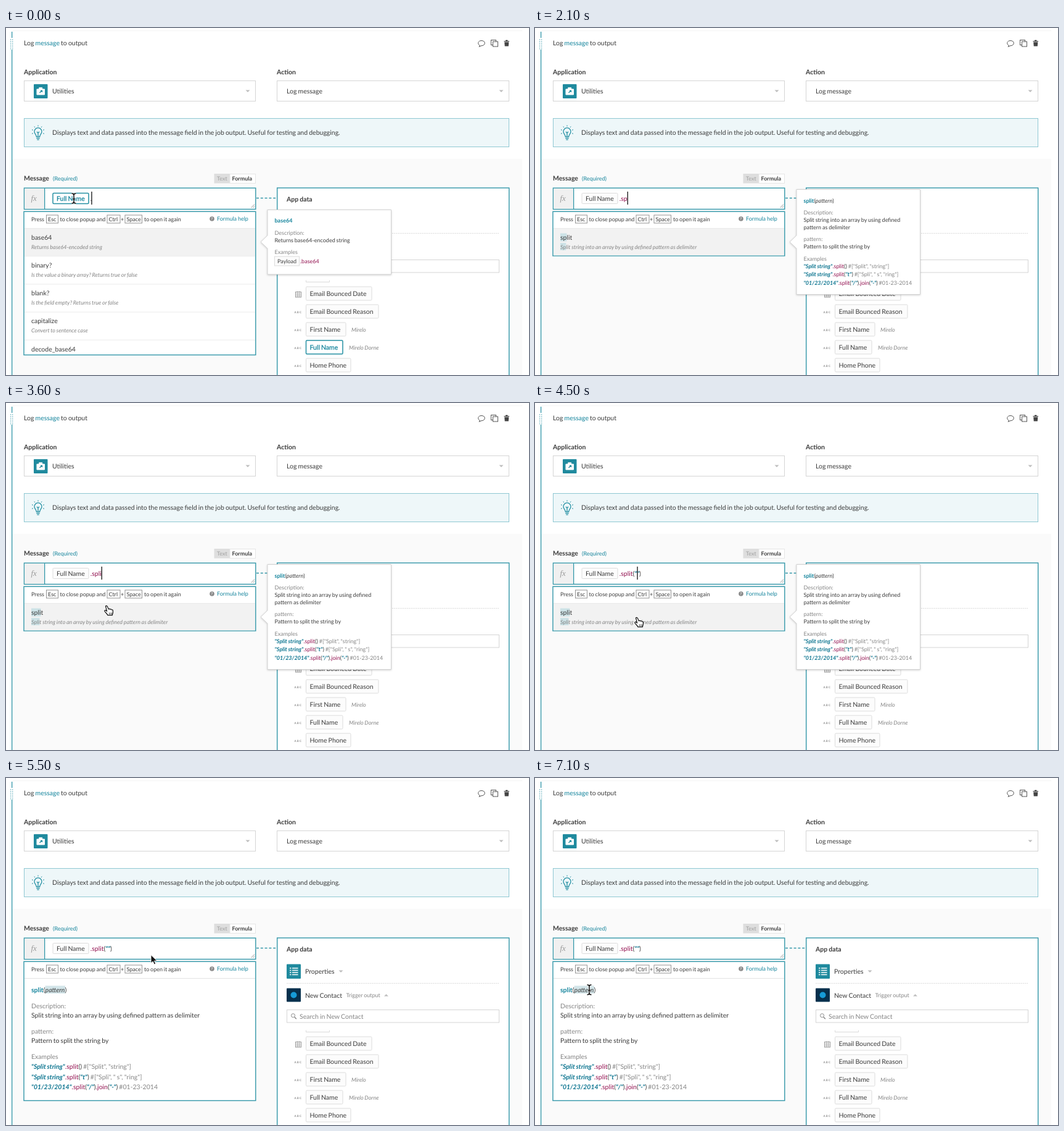
Animation of 848x562 px, one loop 7200 ms. Source, as an HTML page:

```html
<!DOCTYPE html>
<html lang="en">
<head>
<meta charset="utf-8">
<title>Formula autocomplete</title>
<style>
html, body { margin: 0; width: 100%; height: 100%; overflow: hidden; background: #fff; }
svg { display: block; width: 848px; height: 562px; }
text { font: 10.5px Lato, sans-serif; word-spacing: -.054em; fill: #3c3c3c; text-rendering: geometricPrecision; white-space: pre; }
.b { font-weight: 700; }
.s { font-size: 9px; }
.i { font-style: italic; }
.g { fill: #858585; }
.l { fill: #a0a0a0; }
.t { fill: #14849c; }
.m { fill: #92104f; }
.q { fill: #0d7590; font-weight: 700; font-style: italic; }
.abc { font-size: 4.6px; font-weight: 700; letter-spacing: 1.1px; fill: #8c8c8c; }
.teal { stroke: #3397a9; stroke-width: 1.4; }
.icon { fill: none; stroke: #555; }
.chip rect { fill: #fcfcfc; stroke: #dcdcdc; }
.chip.on rect { fill: #fff; stroke: #2590a3; stroke-width: 1.5; }
.chip.on text { fill: #14849c; stroke: #14849c; stroke-width: .25; }
.float { filter: drop-shadow(0 1px 1.5px rgba(0, 0, 0, .18)); }
</style>
</head>
<body>
<svg id="stage" viewBox="0 0 848 562"></svg>
<script>
const LOOP = 7200;
const text = (x, mid, str, cls = '') => `<text x="${x}" y="${mid + 3.8}" class="${cls}">${str}</text>`;
const small = (x, mid, str, cls = '') => `<text x="${x}" y="${mid + 3.2}" class="s ${cls}">${str}</text>`;
const rect = (x, y, x2, y2, attrs) => `<rect x="${x}" y="${y}" width="${x2 - x}" height="${y2 - y}" ${attrs}/>`;
const path = (d, attrs) => `<path d="${d}" ${attrs}/>`;
const span = (cls, str) => `<tspan class="${cls}">${str}</tspan>`;
const group = (id, body, attrs = '') => `<g id="${id}" ${attrs}>${body}</g>`;
const chip = (x, mid, w, h, str, id = '') =>
  `<g class="chip" ${id && `id="${id}"`}>${rect(x + .5, mid - h / 2, x + w, mid + h / 2, 'rx="1.5"')}${text(x + 6.5, mid, str)}</g>`;
const caretDown = (x, y, dir = 1) => path(`M${x - 3.5} ${y - 1.5 * dir}h7l-3.5 ${3.5 * dir}z`, 'fill="#bdbdbd"');
const box = 'fill="#fff" stroke="#d5d5d5"';

// Page around the message field
function page() {
  const select = (x, x2) => rect(x + .5, 85.5, x2 - .5, 118.5, box) + caretDown(x2 - 13, 102);
  let dots = '';
  for (let y = 18; y < 34; y += 3) dots += rect(7, y, 8.3, y + 1.3, 'fill="#5fadbb"') + rect(10, y, 11.3, y + 1.3, 'fill="#5fadbb"');
  let rays = '';
  for (let k = 0; k < 7; k++) {
    const a = Math.PI * (1 + (k - .5) / 5), c = Math.cos(a), s = Math.sin(a);
    rays += `M${52 + c * 8.5} ${168 + s * 8.5}L${52 + c * 10.5} ${168 + s * 10.5}`;
  }
  return rect(0, 0, 848, 562, 'fill="#fff"')
    + rect(10, 212, 837, 562, 'fill="#fafafa"')
    + rect(10, 4, 837, 5, 'fill="#f3f3f3"')
    + rect(9, 6, 10.3, 562, 'fill="#3397a9"')
    + rect(6, 16, 13, 35, 'fill="#fff"') + dots
    + text(29, 24.3, `Log ${span('t', 'message')} to output`)
    + path('M768.3 28.4C764 26 765 20.5 771 20.5c7 0 7 8 0 8.2l-4 1.6z', 'class="icon"')
    + rect(786.5, 19.5, 794.5, 27.5, 'class="icon"') + rect(789.5, 22, 797.5, 30, 'class="icon" style="fill:#fff"')
    + path('M807.5 21h8.5v1.3h-8.5zM810 19.4h3.5v1.6h-3.5zM808.2 23h7.1l-.5 6.5h-6.1z', 'fill="#444"')
    + text(29, 71.2, 'Application', 'b') + text(439, 71.2, 'Action', 'b')
    + select(29, 405) + select(439, 816)
    + rect(45, 91, 67.5, 114, 'fill="#1f8a9e" rx="1"')
    + path('M50 99h12.5v9h-12.5zM53.7 99v-2.3h5v2.3', 'fill="#fff" stroke="#fff"')
    + path('M54.5 105l3.5-3.5M56 101.5h2.5v2.5', 'fill="none" stroke="#1f8a9e" stroke-width="1.3"')
    + text(75, 102.2, 'Utilities') + text(455, 102.2, 'Log message')
    + rect(29.5, 146.5, 815.5, 192.5, 'fill="#eef7f9" stroke="#8fc8d3"')
    + path('M49.3 176c0-3.500-3.300-4.500-3.300-8.300a6 6 0 0 1 12 0c0 3.800-3.300 4.800-3.300 8.300zM49.300 178.500h5.400M50.300 180.800h3.400M50 168l2 2 2-2M52 170v5', 'fill="none" stroke="#2590a3" stroke-width="1.3"')
    + path(rays, 'stroke="#2590a3"')
    + text(75, 169.2, 'Displays text and data passed into the message field in the job output. Useful for testing and debugging.')
    + text(29, 243.2, 'Message', 'b') + small(76, 243.5, '(Required)', 't')
    + rect(337.5, 236, 363, 251.5, 'fill="#dedede"') + small(342, 243.7, 'Text', 'l')
    + rect(363, 236.5, 404.5, 251.5, 'fill="#fff" stroke="#e6e6e6"') + small(366.5, 243.7, 'Formula', 'b');
}

function dataPanel() {
  const fields = [
    [430, 107, 'Email Bounced Date'], [459, 118, 'Email Bounced Reason'],
    [488, 65, 'First Name', 'Mirelo', 560], [517, 60, 'Full Name', 'Mirelo Dorne', 556], [546, 73, 'Home Phone']
  ];
  let grid = '';
  for (let y = 430; y < 436; y += 2) grid += `M470.5 ${y}h7`;
  return path('M406 275.5H439', 'stroke="#3397a9" stroke-width="1.3" stroke-dasharray="4 2.8"')
    + rect(439.7, 259, 815.7, 570, 'fill="#fff" class="teal"')
    + text(455, 277, 'App data', 'b')
    + rect(455, 301.5, 478, 325, 'fill="#1f8a9e" rx="1"')
    + path('M460 308h2.5M464 308h9.5M460 311.5h2.5M464 311.5h9.5M460 315h2.5M464 315h9.5M460 318.5h2.5M464 318.5h9.5', 'stroke="#fff" stroke-width="1.5"')
    + text(485, 313.2, 'Properties') + caretDown(543, 313)
    + path('M455 332.5H800', 'stroke="#dcdcdc" stroke-dasharray="2 1"')
    + rect(455, 340.5, 478, 362.5, 'fill="#06304d" rx="1"') + '<circle cx="466.5" cy="351.5" r="5" fill="#169bd7"/>'
    + text(485, 351.7, 'New Contact') + small(551.5, 352, 'Trigger output', 'g') + caretDown(616.5, 352, -1)
    + rect(455.5, 375.5, 799.5, 396, box)
    + path('M467.8 387.3l3 3', 'stroke="#888" stroke-width="1.6"') + '<circle cx="465.5" cy="384.7" r="3" class="icon" style="stroke:#888"/>'
    + text(476, 385.7, 'Search in New Contact', 'g')
    + path('M486.5 408.5v3h38v-3', 'fill="#fcfcfc" stroke="#dcdcdc"')
    + rect(469.5, 427.5, 478.5, 436, 'fill="none" stroke="#999"') + path(grid + 'M472.5 426v10M475.5 426v10', 'stroke="#aaa" stroke-width=".8"')
    + fields.map(([y, w, label, sample, sx], k) =>
      chip(486, y, w, 22, label, k === 3 ? 'panelChip' : '')
      + (k ? `<text x="467.5" y="${y + 3}" class="abc">ABC</text>` : '')
      + (sample ? small(sx, y + .3, sample, 'i g') : '')).join('');
}

const field = () => rect(29.5, 259.2, 404.8, 293.5, 'fill="#fff" class="teal"')
  + rect(30.2, 259.9, 62, 292.8, 'fill="#f0f0f0"')
  + rect(62, 259.5, 63.3, 293, 'fill="#3397a9"')
  + '<text x="40.5" y="279.5" class="i" style="font-family:\'Liberation Serif\',serif;font-size:13px;fill:#999">fx</text>'
  + path('M397.5 291l5.5-5.5M400.5 291l2.5-2.5', 'stroke="#999"')
  + chip(75.5, 276, 58.5, 17, 'Full Name', 'inputChip')
  + '<text id="code" x="136.8" y="279.8"></text>'
  + group('caret', rect(0, 265, 1.3, 286, 'fill="#111"'));

function popupFrame(bottom) {
  const key = (x, x2, str) => rect(x + .5, 303, x2, 316, 'fill="#fff" stroke="#888" stroke-width=".9"') + small(x + 3, 309.7, str);
  return rect(29, 297.3, 404.8, bottom, 'fill="#fff" class="teal"')
    + small(41, 309.7, 'Press') + key(65, 84.5, 'Esc')
    + small(87.5, 309.7, 'to close popup and') + key(163.5, 185, 'Ctrl')
    + small(186, 309.7, '+') + key(192.5, 220.5, 'Space')
    + small(224, 309.7, 'to open it again')
    + '<circle cx="334" cy="309" r="3.8" fill="#8a8a8a"/><text x="332.5" y="311.3" style="font-size:6px;font-weight:700;fill:#fff">?</text>'
    + small(342, 309, 'Formula help', 't')
    + rect(30, 324, 404, 325, 'fill="#e3e3e3"');
}

const row = (k, name, note) => text(41, 339 + k * 45.2, name) + small(41, 354.3 + k * 45.2, note, 'i g');

function listPopup() {
  const items = [
    ['base64', 'Returns base64-encoded string'], ['binary?', 'Is the value a binary array? Returns true or false'],
    ['blank?', 'Is the field empty? Returns true or false'], ['capitalize', 'Convert to sentence case'], ['decode_base64', '']
  ];
  return popupFrame(529.5) + rect(30, 324.5, 404, 369, 'fill="#f2f2f2"')
    + items.map((it, k) => row(k, ...it) + (k ? rect(30, 324 + k * 45.2, 404, 325 + k * 45.2, 'fill="#ececec"') : '')).join('');
}

const SPLIT_NOTE = 'Split string into an array by using defined pattern as delimiter';
const matchPopup = () => popupFrame(369) + rect(30, 324.5, 404, 368.3, 'fill="#f2f2f2"')
  + `<rect id="mark1" x="41" y="332.5" height="13" fill="#cde3e7"/><rect id="mark2" x="41" y="348" height="12" fill="#cde3e7"/>`
  + row(0, 'split', SPLIT_NOTE);

const call = (name, arg = '') => span('m', '.' + name) + '(' + (arg && span('q', `"${arg}"`)) + ')';
const examples = [
  span('q', '"Split string"') + call('split') + span('g', ' #["Split", "string"]'),
  span('q', '"Split string"') + call('split', 't') + span('g', ' #["Spli", " s", "ring"]'),
  span('q', '"01/23/2014"') + call('split', '/') + call('join', '-') + span('g', ' #01-23-2014')
];
const signature = span('t b', 'split') + '(' + span('i', 'pattern') + ')';

const docsPopup = () => popupFrame(522.5)
  + rect(63.5, 336.5, 96, 349, 'fill="#d3e5e9"')
  + text(41, 343, signature)
  + text(41, 369, 'Description:', 'g') + text(41, 384, SPLIT_NOTE)
  + text(41, 410, 'pattern:', 'g') + text(41, 425, 'Pattern to split the string by')
  + text(41, 451.5, 'Examples', 'g')
  + examples.map((e, k) => text(41, 467 + k * 16.8, e)).join('');

const bubble = (top, bottom) => `<g class="float">${path(`M424 ${top}H624.5V${bottom}H424V357L413 346.5L424 336z`, 'fill="#fff" stroke="#d2d2d2"')}</g>`;
const baseTip = () => bubble(294.5, 399)
  + small(435.5, 312, 'base64', 't b') + small(435.5, 331.5, 'Description:', 'g')
  + small(435.5, 343.7, 'Returns base64-encoded string') + small(435.5, 363, 'Examples', 'g')
  + rect(435.5, 370, 475.5, 385, 'fill="#fcfcfc" stroke="#dcdcdc"')
  + small(440, 377.7, 'Payload') + small(477, 377.7, '.base64', 'm');
const splitTip = () => bubble(261.5, 431.5)
  + small(435.5, 280, signature) + small(435.5, 298.7, 'Description:', 'g')
  + small(435.5, 311, 'Split string into an array by using defined') + small(435.5, 323, 'pattern as delimiter')
  + small(435.5, 342, 'pattern:', 'g') + small(435.5, 354, 'Pattern to split the string by')
  + small(435.5, 373.5, 'Examples', 'g')
  + examples.map((e, k) => small(435.5, 385.5 + k * 13.5, e)).join('');

// Pointer shapes: beam and hand are centred, the arrow hangs from its tip
const BEAM = 'M-3.5-8q3.5 0 3.5 2.5q0-2.5 3.5-2.5M0-6V6M-3.5 8q3.5 0 3.5-2.5q0 2.5 3.5 2.5M-1.8 1h3.6';
const HAND = 'M-4.5-7c1.5-1.5 2.5-.3 3 .8l1.8 4.2c.8-1 2-.8 2.6.2 1-.6 2.1-.2 2.5.7 1-.3 2 .2 2 1.5v3c0 1.5-1 2.5-1 4.3h-7.5c-.8-2.5-3-3.7-4.8-6.2-1-1.7 1-2.5 2.3-1.2l1.2 1z';
const ARROW = 'M0 0V13.5L3.2 10.6L5.3 15.5L7.7 14.5L5.6 9.7H10z';
const pointers = () => group('beam', path(BEAM, 'fill="none" stroke="#fff" stroke-width="3"') + path(BEAM, 'fill="none" stroke="#111" stroke-width="1.5"'))
  + group('hand', path(HAND, 'fill="#fff" stroke="#111" stroke-width="1.2" stroke-linejoin="round"') + path('M1.5 3.5v3M3.7 3.5v3M5.7 3.5v3', 'stroke="#111" stroke-width=".8"'))
  + group('arrow', path(ARROW, 'fill="#111" stroke="#fff"'));

const stage = document.getElementById('stage');
stage.innerHTML = page() + dataPanel() + field()
  + group('list', listPopup()) + group('match', matchPopup()) + group('docs', docsPopup())
  + group('baseTip', baseTip()) + group('splitTip', splitTip()) + pointers();

const el = {};
stage.querySelectorAll('[id]').forEach(n => el[n.id] = n);
const show = (id, on) => el[id].style.display = on ? '' : 'none';

// [time, typed code, caret x]
const typing = [
  [0, '.', 138.3], [1900, '.s', 143.7], [2100, '.sp', 149.6], [2300, '.spl', 152.1],
  [2600, '.spli', 154.6], [4300, '.split("")', 165.4]
];
// [time, x, y]
const moves = [
  [0, 110, 276], [800, 110, 276], [1200, 162, 277], [3100, 162, 277], [3500, 166, 336],
  [3800, 166, 336], [4200, 168, 355], [4700, 168, 355], [5400, 235, 286.5], [5700, 235, 286.5], [6700, 88, 343], [LOOP, 88, 343]
];
// [time, pointer]
const shapes = [[0, 'beam'], [1700, ''], [3100, 'beam'], [3300, 'hand'], [4700, 'arrow'], [6500, 'beam']];
const at = (steps, t) => steps.findLast(s => s[0] <= t);

function pointerAt(t) {
  const n = moves.findIndex(m => m[0] > t), [t0, x0, y0] = moves[n - 1], [t1, x1, y1] = moves[n];
  const u = (t - t0) / (t1 - t0), e = u * u * (3 - 2 * u);
  return [x0 + (x1 - x0) * e, y0 + (y1 - y0) * e];
}

function draw(time) {
  const t = Math.floor(time % LOOP / 100) * 100;
  const [typedAt, code, caretX] = at(typing, t);
  const filtered = t >= 2100, docs = t >= 4700;

  const [, name, quotes] = code.match(/^([.a-z]+)(\(.*)?$/);
  el.code.innerHTML = span(name === '.' ? '' : 'm', name) + (quotes ? '(' + span('q', '""') + ')' : '');
  el.caret.setAttribute('transform', `translate(${caretX} 0)`);
  show('caret', t < 4900 && (t - typedAt) % 1000 < 500);

  const hover = t < 1000;
  el.inputChip.classList.toggle('on', hover);
  el.panelChip.classList.toggle('on', hover);

  show('list', !filtered);
  show('baseTip', !filtered);
  show('match', filtered && !docs);
  show('splitTip', filtered && !docs);
  show('docs', docs);
  const matched = Math.min(name.length - 1, 4);
  el.mark1.setAttribute('width', [0, 4.6, 10.5, 13, 15.5][matched]);
  el.mark2.setAttribute('width', [0, 4.7, 9.3, 11.4, 13.5][matched]);

  const shape = at(shapes, t)[1], [x, y] = pointerAt(t);
  for (const id of ['beam', 'hand', 'arrow']) show(id, id === shape);
  if (shape) el[shape].setAttribute('transform', `translate(${x} ${y})`);
}

const start = performance.now();
(function tick() {
  draw(Math.max(0, performance.now() - start));
  requestAnimationFrame(tick);
})();
</script>
</body>
</html>
```
